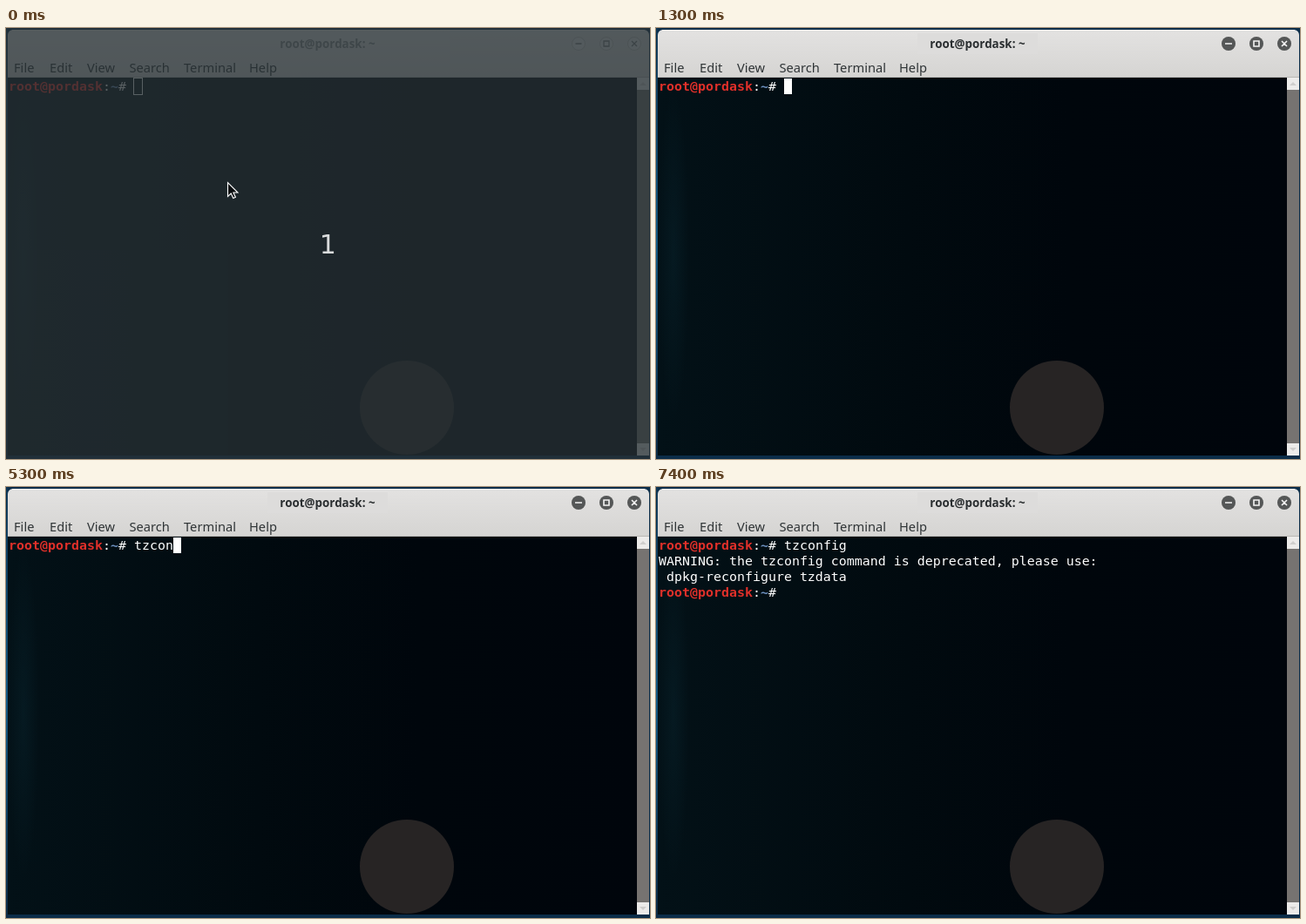
An HTML page for the animation above (8 s loop, 739 by 495 pixels).

```html
<!DOCTYPE html>
<html lang="en">
<head>
<meta charset="utf-8">
<title>Terminal session</title>
<style>
  html, body { margin: 0; width: 100%; height: 100%; overflow: hidden; background: #0d3553; }
  svg { position: absolute; left: 0; top: 0; width: 739px; height: 495px; }
  .menu { font: 14.67px "Noto Sans", sans-serif; fill: #2f3436; }
  .title { font: bold 13.4px "Noto Sans", sans-serif; text-anchor: middle; }

  pre {
    position: absolute; left: 3px; top: 58px; margin: 0;
    font: 14.95px/18px "DejaVu Sans Mono", monospace; color: #fff;
  }
  pre b { color: #e0302a; }
  pre i { font-style: normal; font-weight: bold; color: #6c8fbd; }
  .typed { display: inline-block; height: 18px; overflow: hidden; vertical-align: top; }
  .cursor {
    display: inline-block; box-sizing: border-box; position: relative;
    width: 9px; height: 18px; vertical-align: top; background: #fff;
  }
  .cursor.hollow {
    position: absolute; left: 143px; top: -1px; width: 11px; height: 20px;
    border: 1px solid #fff; background: none;
  }

  .typed, .cursor, .output, .veil, .beam, .beam path, .focus {
    animation: 8s step-end infinite;
  }
  .typed { animation-name: type; }
  .first { animation-name: blink; }
  .last, .output { animation-name: reply; }
  .last { animation-name: lastblink; }
  .hollow { animation-name: idle; }
  .veil { animation-name: veil; }
  .beam { animation-name: beam; }
  .beam path { animation-name: drift; }
  .focus { animation-name: focus; }

  @keyframes type {
    0% { width: 0; }        18.75% { width: 1ch; }  38.75% { width: 2ch; }
    42.5% { width: 3ch; }   45% { width: 4ch; }     51.25% { width: 5ch; }
    71.25% { width: 6ch; }  73.75% { width: 7ch; }  85%, 100% { width: 8ch; }
  }
  @keyframes blink {
    0% { opacity: 0; }      6.25% { opacity: 1; }   25% { opacity: 0; }
    37.5% { opacity: 1; }   58.75% { opacity: 0; }  66.25% { opacity: 1; }
    85%, 100% { opacity: 0; }
  }
  @keyframes reply { 0% { opacity: 0; } 85%, 100% { opacity: 1; } }
  @keyframes lastblink { 0% { opacity: 0; } 85% { opacity: 1; } 92.5%, 100% { opacity: 0; } }
  @keyframes idle { 0% { opacity: 1; } 6.25%, 100% { opacity: 0; } }
  @keyframes veil { 0% { opacity: 1; } 1.25%, 100% { opacity: 0; } }
  @keyframes beam { 0% { opacity: 0; } 1.25% { opacity: 1; } 16.25%, 100% { opacity: 0; } }
  @keyframes drift {
    0% { transform: none; }
    1.25% { transform: translate(0, 0); animation-timing-function: steps(4, end); }
    6.25%, 100% { transform: translate(2px, -33px); }
  }
  @keyframes focus {
    0% { opacity: 0; }
    6.25% { opacity: .33; animation-timing-function: steps(2, end); }
    8.75%, 100% { opacity: 1; }
  }
</style>
</head>
<body>
<svg viewBox="0 0 739 495">
  <defs>
    <linearGradient id="desk" x2="0" y2="1">
      <stop offset="0" stop-color="#0d3553"/>
      <stop offset=".5" stop-color="#135a85"/>
      <stop offset="1" stop-color="#0b2b47"/>
    </linearGradient>
    <linearGradient id="bar" x2="0" y2="1">
      <stop offset="0" stop-color="#e3e2e1"/>
      <stop offset="1" stop-color="#d5d4d2"/>
    </linearGradient>
    <linearGradient id="screen">
      <stop offset="0" stop-color="#031117"/>
      <stop offset=".4" stop-color="#010a0f"/>
      <stop offset=".65" stop-color="#00060c"/>
      <stop offset="1" stop-color="#00050c"/>
    </linearGradient>
    <radialGradient id="glow">
      <stop offset="0" stop-color="#08212a" stop-opacity=".55"/>
      <stop offset="1" stop-color="#08212a" stop-opacity="0"/>
    </radialGradient>
  </defs>

  <rect width="739" height="495" fill="#0b2d49"/>
  <rect width="2" height="495" fill="url(#desk)"/>
  <path d="M2 57V8a6 6 0 0 1 6-6H732a6 6 0 0 1 6 6V57Z" fill="url(#bar)"/>
  <path d="M7 2.5H733" stroke="#f0efee"/>
  <path d="M2 56.5H738" stroke="#b9b8b5"/>
  <rect x="2" y="57" width="722" height="434" fill="url(#screen)"/>
  <ellipse cx="20" cy="260" rx="18" ry="190" fill="url(#glow)"/>
  <circle cx="460" cy="436" r="54" fill="#272424"/>

  <rect x="724" y="57" width="14" height="434" fill="#767371"/>
  <path d="M724 57h14v14h-14zM724 477h14v14h-14z" fill="#ecebea"/>
  <path d="M727 66l4-4 4 4zM727 482l4 4 4-4z" fill="#cfcecd"/>

  <g class="menu">
    <text x="9" y="51">File</text>
    <text x="50" y="51">Edit</text>
    <text x="93" y="51">View</text>
    <text x="141.4" y="51">Search</text>
    <text x="204" y="51">Terminal</text>
    <text x="279" y="51">Help</text>
  </g>

  <text class="title" x="369" y="23" fill="#8b8e8f">root@pordask: ~</text>
  <g fill="#e8e7e6" stroke="#c3c2c0">
    <circle cx="657" cy="18" r="7.5"/>
    <circle cx="689" cy="18" r="7.5"/>
    <circle cx="721" cy="18" r="7.5"/>
  </g>
  <path id="signs" d="M653.5 18h7M686 15h6v6h-6zM718 15l6 6M724 15l-6 6" fill="none" stroke="#7d8081" stroke-width="1.3"/>

  <g class="focus">
    <rect x="300" y="6" width="138" height="24" fill="#dddcdb"/>
    <text class="title" x="369" y="23" fill="#2b2f31">root@pordask: ~</text>
    <g fill="#555757">
      <circle cx="657" cy="18" r="8"/>
      <circle cx="689" cy="18" r="8"/>
      <circle cx="721" cy="18" r="8"/>
    </g>
    <path d="M653 18h8M686 15h6v6h-6zM718 15l6 6M724 15l-6 6" fill="none" stroke="#f4f4f4" stroke-width="1.6"/>
  </g>
</svg>

<pre><span class="cursor hollow"></span><b>root@pordask</b>:<i>~</i># <span class="typed">tzconfig</span><span class="cursor first"></span>
<span class="output">WARNING: the tzconfig command is deprecated, please use:
 dpkg-reconfigure tzdata
<b>root@pordask</b>:<i>~</i># </span><span class="cursor last"></span></pre>

<svg viewBox="0 0 739 495">
  <g class="beam" fill="none">
    <path d="M251 171.5h2l1 1 1-1h2M254 172v14M251 186.5h2l1-1 1 1h2" stroke="#fff" stroke-width="3"/>
    <path d="M251 171.5h2l1 1 1-1h2M254 172v14M251 186.5h2l1-1 1 1h2" stroke="#000"/>
  </g>
  <g class="veil">
    <rect width="739" height="495" fill="#283135" fill-opacity=".77"/>
    <text x="359.7" y="259" font-size="30" font-family="DejaVu Sans, sans-serif" fill="#d9dbdc">1</text>
    <path d="M254.5 177.5V193.500l3.700-3.500 2.600 5.500 2.600-1.200-2.500-5.300h5.100Z" fill="#0a0d0f" stroke="#fff" stroke-width="1.1"/>
  </g>
</svg>
</body>
</html>
```
